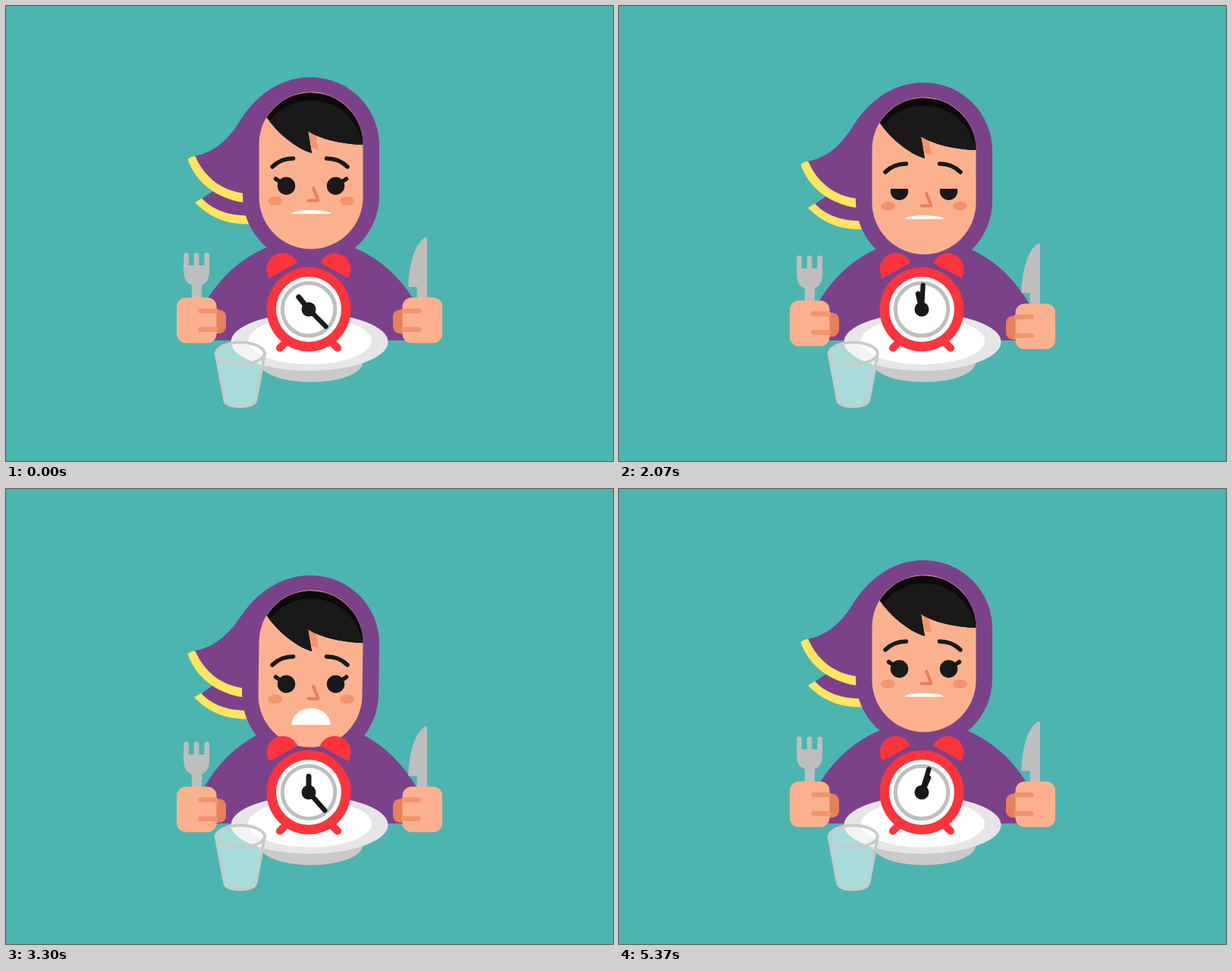
An HTML page with a canvas for the animation above (5400 ms loop, 800 by 600 pixels).

```html
<!DOCTYPE html>
<html lang="en">
<head>
<meta charset="utf-8">
<title>Waiting for dinner</title>
<style>
html, body { margin: 0; width: 100%; height: 100%; overflow: hidden; background: #4cb5b0; }
canvas { display: block; }
</style>
</head>
<body>
<canvas id="stage" width="800" height="600"></canvas>
<script>
const c = document.getElementById('stage').getContext('2d');
const LOOP = 5400, TAU = Math.PI * 2;
const BG = '#4cb5b0', PURPLE = '#7b428a', YELLOW = '#ffe560', SKIN = '#fcb18e',
  BLUSH = '#f2946d', DARK = '#e58058', RED = '#fc343c', GREY = '#bebebe', INK = '#191919';

// Motion keys: [time, value]
const HEAD = [[0, 0], [600, .4], [1170, 3], [1290, 4], [1740, 5.5], [2070, 7], [2160, 8],
  [2290, 17], [2430, 19.5], [3300, 20], [3480, 20], [3960, 16], [4600, 16], [4760, 12], [4960, 3], [5180, 0]];
const LAG = [[2150, 0], [2400, 10.5], [2730, 9], [3300, 5], [3960, 2], [4500, 0]];
const MOUTH = [[2150, 274], [2380, 295], [2730, 294.5], [3300, 291], [4560, 279], [5100, 274]];
const LID = [[1600, 225], [1950, 234], [2120, 234], [2220, 225]];
const MINUTE = [[0, 135], [4560, 637], [5370, 737], [5400, 740]];
const HOUR = [[0, -39], [2070, -13], [3300, 0], [5400, 25]];

// Moments when each fist hits the table
const LEFT = [180, 690, 1200, 1700, 2088, 2738, 3300];
const RIGHT = [180, 690, 1200, 1700, 2440, 3100];

function at(keys, t) {
  if (t <= keys[0][0]) return keys[0][1];
  for (let i = 1; i < keys.length; i++) {
    const [a, v] = keys[i - 1], [b, w] = keys[i];
    if (t <= b) return v + (w - v) * (t - a) / (b - a);
  }
  return keys[keys.length - 1][1];
}

function lift(hits, t) {
  let up = 0;
  for (const hit of hits) {
    const d = (hit - t + LOOP) % LOOP;
    if (d < 90) up = Math.max(up, 12 * (1 - (1 - d / 90) ** 2));
    else if (d < 360) up = Math.max(up, 12 * (360 - d) / 270);
  }
  return up;
}

function bounce(t) {
  let b = 0;
  for (const hit of [...LEFT, ...RIGHT]) {
    const d = t - hit;
    if (d > 0 && d < 180) b = Math.max(b, Math.sin(Math.PI * d / 180));
  }
  return b;
}

const fill = (d, color) => { c.fillStyle = color; c.fill(new Path2D(d)); };
function line(d, color, width) {
  c.strokeStyle = color;
  c.lineWidth = width;
  c.lineCap = c.lineJoin = 'round';
  c.stroke(new Path2D(d));
}
function oval(x, y, rx, ry, color) {
  c.fillStyle = color;
  c.beginPath();
  c.ellipse(x, y, rx, ry, 0, 0, TAU);
  c.fill();
}
function box(x, y, w, h, r, color) {
  c.fillStyle = color;
  c.beginPath();
  c.roundRect(x, y, w, h, r);
  c.fill();
}
function group(x, y, draw) {
  c.save();
  c.translate(x, y);
  draw();
  c.restore();
}
function mirrored(axis, draw) {
  draw();
  c.save();
  c.translate(axis * 2, 0);
  c.scale(-1, 1);
  draw();
  c.restore();
}

function capsule(r, top, bottom, shift, color) {
  c.beginPath();
  c.arc(402, top, r, Math.PI, 0);
  c.arc(402 - shift, bottom, r, 0, Math.PI);
  c.closePath();
  c.fillStyle = color;
  c.fill();
}

function cape(lag) {
  group(-lag * .2, -lag * .85, () => {
    fill('M257 255L274 243L330 235V280Q285 283 257 255Z', PURPLE);
    fill('M249 259L258 253.5C275 271 297 278 330 276V287C295 290 269 280 249 259Z', YELLOW);
  });
  const y = v => v - lag * .9, e = 313 - lag * .2;
  fill(`M402 94C355 94 325 ${125 - lag * .1} 308 ${152 - lag * .4}C292 ${y(178)} 272 ${y(194)} 248 ${y(198)}
    C260 ${y(228)} 285 ${y(244)} ${e} ${y(249)}L402 250Z`, PURPLE);
  fill(`M239.5 ${y(202)}Q244 ${y(198)} 249.5 ${y(198)}C261 ${y(225)} 283 ${y(243)} ${e} ${y(247)}
    V${y(259)}C278 ${y(254)} 250 ${y(233)} 239.5 ${y(202)}Z`, YELLOW);
}

function hair() {
  const shape = new Path2D('M343.5 147C357 166 380 187 403 194L398 165C415 176 442 182 470.5 183A68.5 68.5 0 0 0 343.5 147Z');
  fill('M398 165L408 169L412 190L403 187Z', BLUSH);
  c.fillStyle = '#0b0b0b';
  c.fill(shape);
  c.save();
  c.clip(shape);
  oval(402, 193, 68.5, 68.5, INK);
  c.restore();
}

function face(t) {
  const lid = at(LID, t), mouth = at(MOUTH, t);
  mirrored(402, () => oval(354.5, 257, 9.5, 6, BLUSH));
  mirrored(400.5, () => line('M351 212Q362 201 378.5 201', INK, 5.5));
  c.save();
  c.beginPath();
  c.rect(340, lid, 125, 40);
  c.clip();
  oval(369.5, 237.2, 11.7, 11.7, INK);
  oval(434.5, 237.2, 11.7, 11.7, INK);
  c.restore();
  if (lid < 229) mirrored(402, () => line('M355.5 228L363 233', INK, 5.5));
  line('M405 240L411.5 256.5H398.5', DARK, 4);
  c.fillStyle = '#fff';
  c.beginPath();
  c.ellipse(402, mouth, 25.7, mouth - 269, 0, Math.PI, TAU);
  c.fill();
}

function sweat(t) {
  if (t < 4260 || t > 5010) return;
  c.globalAlpha = Math.min(1, (t - 4260) / 120, (5010 - t) / 150);
  group(447, 211 + (t - 4560) * .035, () =>
    fill('M0 -18C3 -9 12 -4 12 4A12 12 0 0 1 -12 4C-12 -4 -3 -9 0 -18Z', '#c8ebf1'));
  c.globalAlpha = 1;
}

function head(t) {
  const lag = at(LAG, t), shift = lag * .2;
  group(0, at(HEAD, t), () => {
    cape(lag);
    capsule(90, 184, 250, shift, PURPLE);
    capsule(68.5, 182, 252, shift, SKIN);
    hair();
    face(t);
    sweat(t);
  });
}

function plate() {
  oval(402, 470, 68, 26, '#cacaca');
  oval(400, 443, 103.5, 38, '#e6e6e6');
  oval(400.5, 441.5, 81.5, 31, '#fff');
}

function hand(angle, length, width) {
  const a = angle * Math.PI / 180;
  line(`M399 400L${399 + length * Math.sin(a)} ${400 - length * Math.cos(a)}`, INK, width);
}

function clock(t) {
  mirrored(399, () => {
    line('M369 443L361 451', RED, 10);
    fill('M348 358.5Q345.5 359.5 345.3 355A21 21 0 0 1 382 335Q385 338 383 339Z', RED);
  });
  oval(399, 400, 55.5, 55.5, RED);
  oval(399, 400, 43, 43, '#fff');
  c.strokeStyle = GREY;
  c.lineWidth = 5;
  c.beginPath();
  c.arc(399, 400, 34.8, 0, TAU);
  c.stroke();
  hand(at(HOUR, t), 21, 7);
  hand(at(MINUTE, t), 32, 6.3);
  oval(399, 400, 9.5, 9.5, INK);
}

function glass() {
  const cup = 'M276.5 458L288 519Q289 528 308.5 528Q328 528 329.5 519L341 458';
  const rim = 'M276.5 458A32.3 15.3 0 0 1 341 458A32.3 15.3 0 0 1 276.5 458Z';
  fill(cup + 'A32.3 15.3 0 0 0 276.5 458Z', 'rgba(255,255,255,.52)');
  line(cup, '#c6cbca', 3.8);
  line(rim, '#c6cbca', 3.8);
}

function fist() {
  box(262, 400.5, 28, 31.5, 9, DARK);
  box(225, 384.5, 52.5, 60, 12, SKIN);
  line('M256.5 402H276M256.5 426.7H276', BLUSH, 6.6);
}

function fork() {
  line('M237.5 328.5V345M251 328.5V345M264.7 328.5V345', GREY, 6.6);
  fill('M234.2 342Q237.5 346 240.8 342H247.7Q251 346 254.3 342H261.4Q265 346 268 342V352Q267 365 258 368V387H244.8V368Q235 365 234.2 352Z', GREY);
}

function draw(t) {
  c.fillStyle = BG;
  c.fillRect(0, 0, 800, 600);
  fill('M256 441V402C285 350 320 318 401 300C482 318 517 350 546 402V441Z', PURPLE);
  head(t);
  const b = bounce(t);
  group(b * .5, -b * 3.5, plate);
  group(-b * 1.5, -b * 3.8, () => clock(t));
  group(b, -b * 3.5, glass);
  group(0, 8 - lift(LEFT, t), () => {
    fork();
    fist();
  });
  group(0, 8 - lift(RIGHT, t), () => {
    fill('M555 307Q555 304.5 552 305.5C537 315 531 345 530.3 370.5H541.5V387H555Z', GREY);
    c.translate(800, 0);
    c.scale(-1, 1);
    fist();
  });
}

function tick() {
  draw(performance.now() % LOOP);
  requestAnimationFrame(tick);
}
tick();
</script>
</body>
</html>
```
